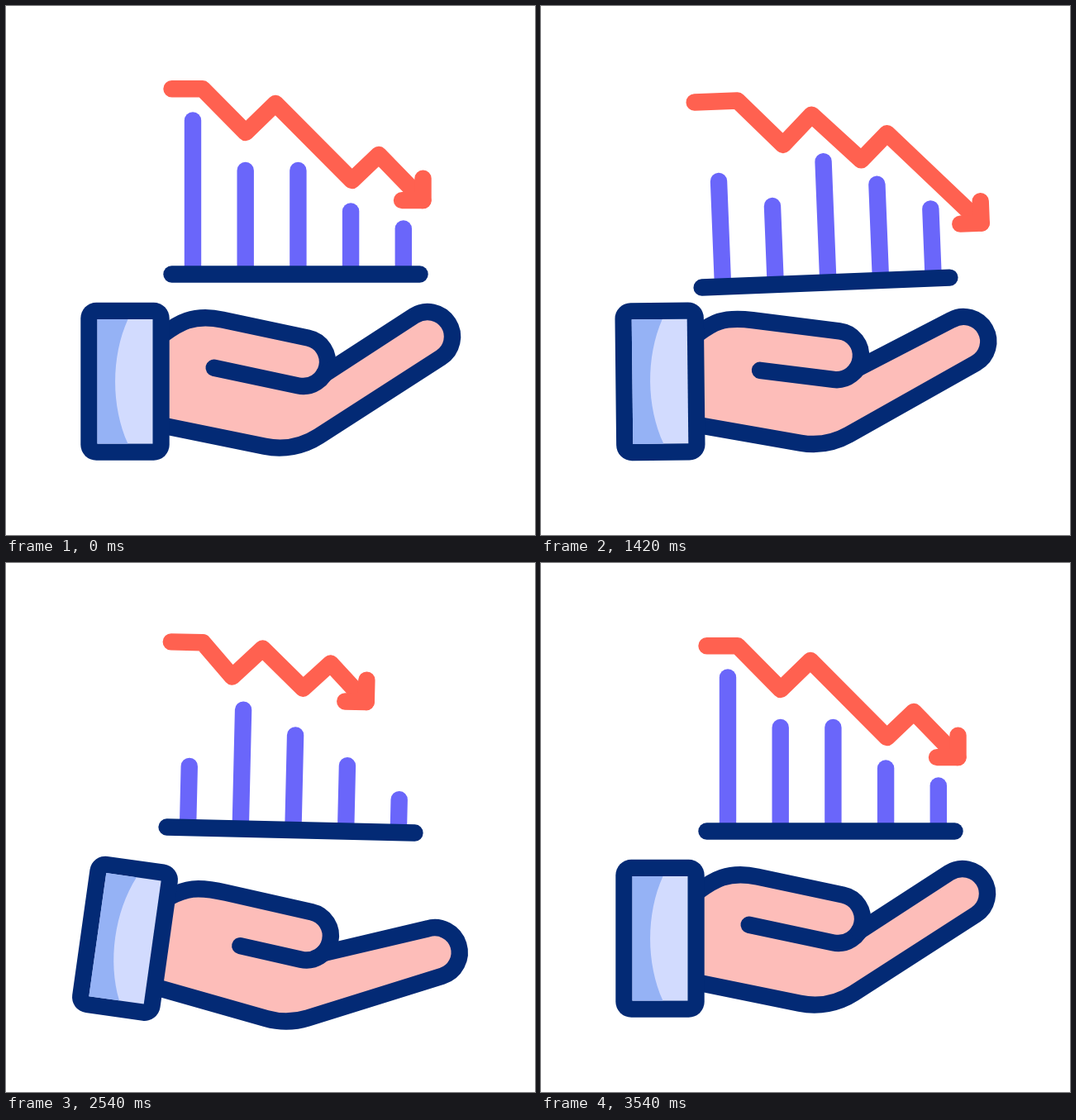
An HTML page with a canvas for the animation above (3.6 s loop, 640 by 640 pixels).

```html
<!DOCTYPE html>
<html lang="en">
<head>
<meta charset="utf-8">
<title>Falling chart on a hand</title>
<style>
  html, body { margin: 0; width: 100%; height: 100%; overflow: hidden; background: #fff; }
  canvas { display: block; width: 100vw; height: 100vh; }
</style>
</head>
<body>
<canvas id="stage" width="640" height="640"></canvas>
<script>
const ctx = document.getElementById('stage').getContext('2d');
const LOOP = 3600;
const RAD = Math.PI / 180;
const QUARTER = Math.PI / 2;
const COLOR = {
  navy: '#032a75', skin: '#fdbdb9', red: '#ff6150',
  bar: '#6a66fa', cuff: '#d2dbfe', cuffShade: '#95b2f5'
};
const CUFF = [144, 454.3];
const WRIST = [153, 480];

// Hand poses, all in degrees except the crease length.
const REST = { cuff: 0, palm: 11.5, swing: 0, finger: -32.8, thumbSwing: 0, thumb: 12, crease: 104 };
const LOW = { cuff: 5.5, palm: 14.4, swing: 8.4, finger: -19.4, thumbSwing: 2.4, thumb: 8.1, crease: 73 };
const HIGH = { cuff: -6, palm: 5.9, swing: -5.6, finger: -38.2, thumbSwing: -6.2, thumb: 6.4, crease: 104 };
const LOWEST = { cuff: 8.2, palm: 16, swing: 11.5, finger: -17, thumbSwing: 5.8, thumb: 12.8, crease: 75 };

const HAND_KEYS = [[200, REST], [1030, LOW], [1780, HIGH], [2600, LOWEST], [3340, REST]];
const BOB_KEYS = [[200, 324.5], [820, 304], [1490, 335.5], [2140, 307], [2880, 335.5], [3460, 324.5]];
const TILT_KEYS = [[200, 0], [950, 6.1], [1600, -4.2], [2210, 6.5], [2880, -4], [3460, 0]];
const DRIFT_KEYS = [[200, 350.5], [950, 344.5], [2880, 344.5], [3460, 350.5]];
const ARROW_KEYS = [[200, 53.5], [1300, 112], [2400, 44], [2900, 45], [3440, 115], [3540, 53.5]];

const mix = (a, b, w) => a + (b - a) * w;

// Eases in and out between neighbouring keys; returns both values and the blend.
function locate(keys, t) {
  const next = keys.findIndex(([time]) => time > t);
  if (next === 0) return [keys[0][1], keys[0][1], 0];
  if (next < 0) return [keys.at(-1)[1], keys.at(-1)[1], 0];
  const [[t0, a], [t1, b]] = [keys[next - 1], keys[next]];
  const u = (t - t0) / (t1 - t0);
  return [a, b, u * u * (3 - 2 * u)];
}

const follow = (keys, t) => mix(...locate(keys, t));

// Chart data leaves its rest value, turns twice and returns.
const wander = (t, rest, first, second) =>
  follow([[200, rest], [1300, first], [2450, second], [3440, rest]], t);

// Point reached from (x, y) by going `along` a direction and `across` it.
function offset([x, y], angle, along, across) {
  const c = Math.cos(angle), s = Math.sin(angle);
  return [x + along * c - across * s, y + along * s + across * c];
}

// Where two lines, each given by a point and a direction, cross.
function crossing(p, angleP, q, angleQ) {
  const along = ((q[0] - p[0]) * Math.sin(angleQ) - (q[1] - p[1]) * Math.cos(angleQ))
    / Math.sin(angleQ - angleP);
  return offset(p, angleP, along, 0);
}

function polyline(points, color) {
  ctx.beginPath();
  points.forEach(p => ctx.lineTo(...p));
  ctx.strokeStyle = color;
  ctx.stroke();
}

function handPose(t) {
  const [from, to, w] = locate(HAND_KEYS, t);
  const pose = {};
  for (const part in from) pose[part] = mix(from[part], to[part], w);
  return pose;
}

function drawHand(t) {
  const pose = handPose(t);
  const [cuff, palm, finger, thumb] =
    [pose.cuff, pose.palm, pose.finger, pose.thumb].map(a => a * RAD);
  const thumbR = 29.5, fingerR = 30;
  const thumbTip = offset(WRIST, pose.thumbSwing * RAD, 206.5, -49.5);
  const fingerTip = offset(WRIST, pose.swing * RAD, 357, -80);

  const top = offset(CUFF, cuff, 46, -57);
  const topEase = offset(top, cuff, 18, -13);
  const knuckle = offset(thumbTip, thumb, -106, -thumbR);
  const knuckleEase = offset(knuckle, thumb, -37, 0);
  const crease = offset(thumbTip, thumb, -pose.crease, thumbR);
  const web = offset(thumbTip, finger + 63 * RAD, thumbR, 0);
  const bottom = offset(CUFF, cuff, 44, 53);
  const heel = crossing(bottom, palm, offset(fingerTip, finger, 0, fingerR), finger);

  const thumbPath = end => {
    ctx.moveTo(...top);
    ctx.bezierCurveTo(...topEase, ...knuckleEase, ...knuckle);
    ctx.arc(...thumbTip, thumbR, thumb - QUARTER, end);
  };
  const fingerPath = () => {
    ctx.lineTo(...web);
    ctx.arc(...fingerTip, fingerR, finger - QUARTER, finger + QUARTER);
    ctx.arcTo(...heel, ...bottom, 88);
    ctx.lineTo(...bottom);
  };

  ctx.beginPath();
  thumbPath(finger + 63 * RAD);
  fingerPath();
  ctx.fillStyle = COLOR.skin;
  ctx.fill();

  ctx.strokeStyle = COLOR.navy;
  ctx.beginPath();
  thumbPath(thumb + QUARTER);
  ctx.lineTo(...crease);
  ctx.stroke();
  ctx.beginPath();
  fingerPath();
  ctx.stroke();

  drawCuff(cuff);
}

function drawCuff(angle) {
  ctx.save();
  ctx.translate(...CUFF);
  ctx.rotate(angle);
  ctx.fillStyle = COLOR.navy;
  ctx.beginPath();
  ctx.roundRect(-53.7, -95.5, 107.4, 191, 19);
  ctx.fill();
  ctx.fillStyle = COLOR.cuff;
  ctx.fillRect(-33.5, -75.3, 67, 150.6);
  ctx.fillStyle = COLOR.cuffShade;
  ctx.beginPath();
  ctx.moveTo(-33.5, -75.3);
  ctx.lineTo(3.5, -75.3);
  ctx.bezierCurveTo(-17, -30, -17, 30, 3.5, 75.3);
  ctx.lineTo(-33.5, 75.3);
  ctx.fill();
  ctx.restore();
}

function drawBars(t) {
  const tops = [
    wander(t, 138.5, 195, 253),
    wander(t, 199, 231, 180),
    wander(t, 199, 177, 210),
    wander(t, 248.5, 207, 245),
    wander(t, 269.5, 239, 285)
  ];
  tops.forEach((y, i) => {
    const x = 226 + i * 63.7;
    polyline([[x, y], [x, 322]], COLOR.bar);
  });
  polyline([[200.5, 324.5], [500.5, 324.5]], COLOR.navy);
}

function drawTrend(t) {
  const dip = [wander(t, 290, 306.5, 275), wander(t, 153, 156.5, 140.5)];
  const low = [wander(t, 418.5, 400.5, 360), wander(t, 211, 179, 151.5)];
  const crest = [dip[0] + 36, dip[1] - 35];
  const peak = [low[0] + 32.5, low[1] - 31];
  const drop = follow(ARROW_KEYS, t);
  const [x, y] = [peak[0] + drop, peak[1] + drop * 1.03];
  polyline([
    [200.5, 100.3], [wander(t, 238, 253, 239), 100.3],
    dip, crest, low, peak, [x, y]
  ], COLOR.red);
  polyline([[x, y - 26.5], [x, y], [x - 25.5, y]], COLOR.red);
}

function drawChart(t) {
  ctx.save();
  ctx.translate(follow(DRIFT_KEYS, t), follow(BOB_KEYS, t));
  ctx.rotate(follow(TILT_KEYS, t) * RAD);
  ctx.translate(-350.5, -324.5);
  drawBars(t);
  drawTrend(t);
  ctx.restore();
}

function draw(t) {
  ctx.fillStyle = '#fff';
  ctx.fillRect(0, 0, 640, 640);
  ctx.lineWidth = 20.4;
  ctx.lineCap = ctx.lineJoin = 'round';
  drawHand(t);
  drawChart(t);
}

const start = performance.now();
function tick() {
  draw((performance.now() - start) % LOOP);
  requestAnimationFrame(tick);
}
tick();
</script>
</body>
</html>
```
